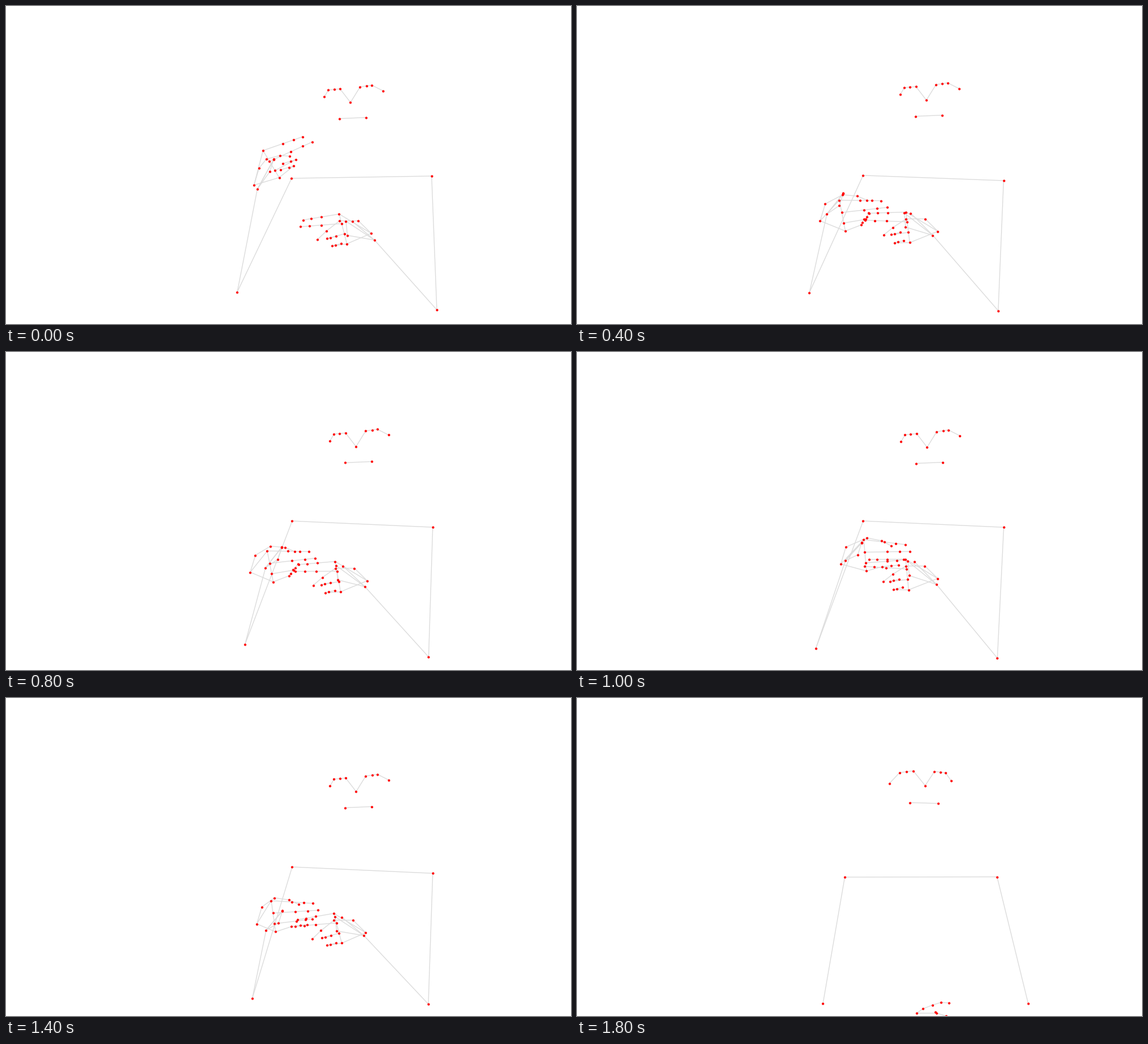
Recreate the animation shown at these times as a matplotlib script. Size 998x561 px, loop 2000 ms.

```python
import numpy as np
import matplotlib.pyplot as plt
from matplotlib.animation import FuncAnimation
from matplotlib.collections import LineCollection

W, H, DPI = 998, 561, 100
FRAMES, STEP = 10, 200
REST = 8  # from this step on the hands are lowered
KEYS = [0, 1, 2, 4, 5, 7]

# Paths at the key steps: hand wrist, arm wrist, elbow, tilt in degrees;
# the left hand adds its index knuckle and the curl of ring and little finger.
LEFT_PATH = [
    [438, 316, 444, 323, 408.5, 504.5, -20, 454, 255, 220],
    [449, 353.5, 449, 347, 409, 499.5, 3, 482.5, 307, 85],
    [429.5, 379, 441.5, 367, 410.5, 505.5, 0, 463.5, 342.5, 80],
    [431.5, 388.5, 458.5, 380.5, 422, 516, 0, 461.5, 351, 75],
    [466, 374, 474, 368, 422, 522.5, 6, 506.5, 331, 15],
    [443, 398.5, 459.5, 409.5, 435, 530, 3, 468.5, 357.5, 20],
]
RIGHT_PATH = [
    [645, 401, 651, 413, 761, 536, -4.5],
    [633, 389.5, 633.5, 394, 745, 533.5, -1],
    [637.5, 397.5, 628.5, 404.5, 744, 537.5, 3],
    [638, 403.5, 634, 414, 746.5, 538, 0],
    [637, 399.5, 635, 410, 742.5, 540, 4.5],
    [635.5, 414, 632, 419, 746, 540, -5],
]

# Hand builds, all as offsets. marks: the arm's index, thumb and little marks.
LEFT = dict(
    side=1, reach=(74, 1), row=(10.5, 54.5), spread=(.4, .74),
    thumb_base=(9, -30), thumb_joint=(6, -46), thumb_tip=(0, 9), arch=3.3,
    middle=(6, -10), ring=(1.5, -7), little=(-2, -11), lift=11,
    marks=[(29, -37), (29, -36), (22, -15)],
)
RIGHT = dict(
    side=-1, reach=(-64.5, 5.5), row=(9.5, 53.5), spread=(.32, .665),
    thumb_base=(-22.5, -22), thumb_joint=(.5, -22), thumb_tip=(-2, 27), arch=1.5,
    middle=(-9, -5), ring=(1.5, 3), little=(-1, -.5), lift=4.8,
    marks=[(-50.5, -37), (-39, -36.5), (-48, -12)],
)
RIGHT_INDEX = (-56.5, -34)  # index knuckle from the wrist
RIGHT_CURL = 123

# ear, outer eye, inner eye, nose, inner eye, outer eye, ear, mouth corners
FACE_UP = [(572.5, 156.5), (579.5, 144.5), (600, 142.5), (618.5, 166.5), (635.5, 139),
           (656, 136), (676, 146), (599, 195), (646, 193)]
FACE_DOWN = [(552, 150.5), (570, 131.5), (594, 128.5), (615, 154.5), (631.5, 129.5),
             (651, 132), (661, 146), (588, 184.5), (638, 186)]

ARMS_DOWN = [(434.5, 538.5), (473, 316), (742, 315.5), (797, 539)]
HAND_DOWN = [
    [(600, 556), (611.5, 548), (628.5, 541.5), (643, 537), (657, 538)],
    [(600, 556), (635.5, 556), (652, 561)],
    [(633.5, 553.5), (635.5, 556)],
]


def track(rows, n):
    """Row of values at step n, blended between the key rows."""
    return np.array([np.interp(n, KEYS, col) for col in zip(*rows)])


def mix(a, b, t):
    return a + (b - a) * t


def turn(v, deg):
    c, s = np.cos(np.radians(deg)), np.sin(np.radians(deg))
    return np.array([v[0] * c - v[1] * s, v[0] * s + v[1] * c])


def straight(root, reach):
    return [root + reach * t for t in (0, .495, .775, 1)]


def folded(root, bend, side, lift, curl):
    """Finger whose end swings round its middle joint."""
    a = np.radians(curl)
    joint = root + bend
    end = np.array([30 * side * np.cos(a), -lift * np.sin(a)])
    return [root, joint, joint + end * (.38 if curl > 45 else .57), joint + end]


def hand(wrist, arm, elbow, index, tilt, curl, build):
    b = {k: np.array(v) for k, v in build.items()}
    side, lift = b["side"], b["lift"]
    reach = turn(b["reach"], tilt)
    little = index + turn(b["row"], tilt)
    middle, ring = (mix(index, little, t) for t in b["spread"])

    thumb = np.array([index[0], wrist[1]]) + b["thumb_joint"]
    tip = thumb + .58 * reach + b["thumb_tip"]
    bend = mix(thumb, tip, .59) - (0, b["arch"])
    m_index, m_thumb, m_little = arm + b["marks"] + (0, .8 * side * tilt)
    return [
        [elbow, arm, m_thumb], [arm, m_index, m_little, arm],
        [wrist, wrist + b["thumb_base"], thumb, bend, tip],
        [wrist, index, middle, ring, little, wrist],
        straight(index, reach),
        straight(middle, reach + b["middle"]),
        folded(ring, .5 * reach + b["ring"], side, lift, curl),
        folded(little, .4 * reach + b["little"], side, lift, curl),
    ]


def face(points, shift):
    p = np.array(points) + shift
    ear1, out1, in1, nose, in2, out2, ear2 = p[:7]
    brows = [ear1, out1, mix(out1, in1, .49), in1, nose,
             in2, mix(in2, out2, .55), out2, ear2]
    return [brows, p[7:]]


def raised(n):
    settle = np.exp(-n)
    bob = np.cos(2 * np.pi * (n - 5) / 4.5)
    left, right = track(LEFT_PATH, n), track(RIGHT_PATH, n)
    lw, la, le = left[:6].reshape(3, 2)
    rw, ra, re = right[:6].reshape(3, 2)
    shoulders = [(505.5 - settle, 298 + 6 * settle),
                 (753.8 - 2 * settle, 309.3 - 9.3 * settle)]
    return (face(FACE_UP, (-10 * settle, 2.5 * settle + 1.5 * bob))
            + [[le, *shoulders, re]]
            + hand(lw, la, le, left[7:9], left[6], left[9], LEFT)
            + hand(rw, ra, re, rw + RIGHT_INDEX, right[6], RIGHT_CURL, RIGHT))


def lowered(n):
    back = FRAMES - 1 - n
    arms = np.array(ARMS_DOWN)
    arms[0] += (-11 * back, -2.5 * back)
    arms[1:] += (1.5 * back, back)
    hands = [np.array(c) + (0, 2.5 * back) for c in HAND_DOWN]
    return face(FACE_DOWN, (0, 2.5 * back)) + [arms] + hands


fig = plt.figure(figsize=(W / DPI, H / DPI), dpi=DPI, facecolor="white")
ax = fig.add_axes([0, 0, 1, 1])
ax.set(xlim=(0, W), ylim=(H, 0))
ax.axis("off")
px = 72 / DPI
bones = LineCollection([], colors="#dcdcdc", linewidths=1.4 * px, zorder=1)
ax.add_collection(bones)
dots = ax.scatter([], [], s=(4.2 * px) ** 2, c="#ff0000", linewidths=0, zorder=2)


def draw(n):
    pose = lowered(n) if n >= REST else raised(n)
    chains = [np.array(c, float) for c in pose]
    bones.set_segments(chains)
    dots.set_offsets(np.unique(np.vstack(chains), axis=0))
    return bones, dots


anim = FuncAnimation(fig, draw, frames=FRAMES, interval=STEP, repeat=True, repeat_delay=0)
plt.show()
```
